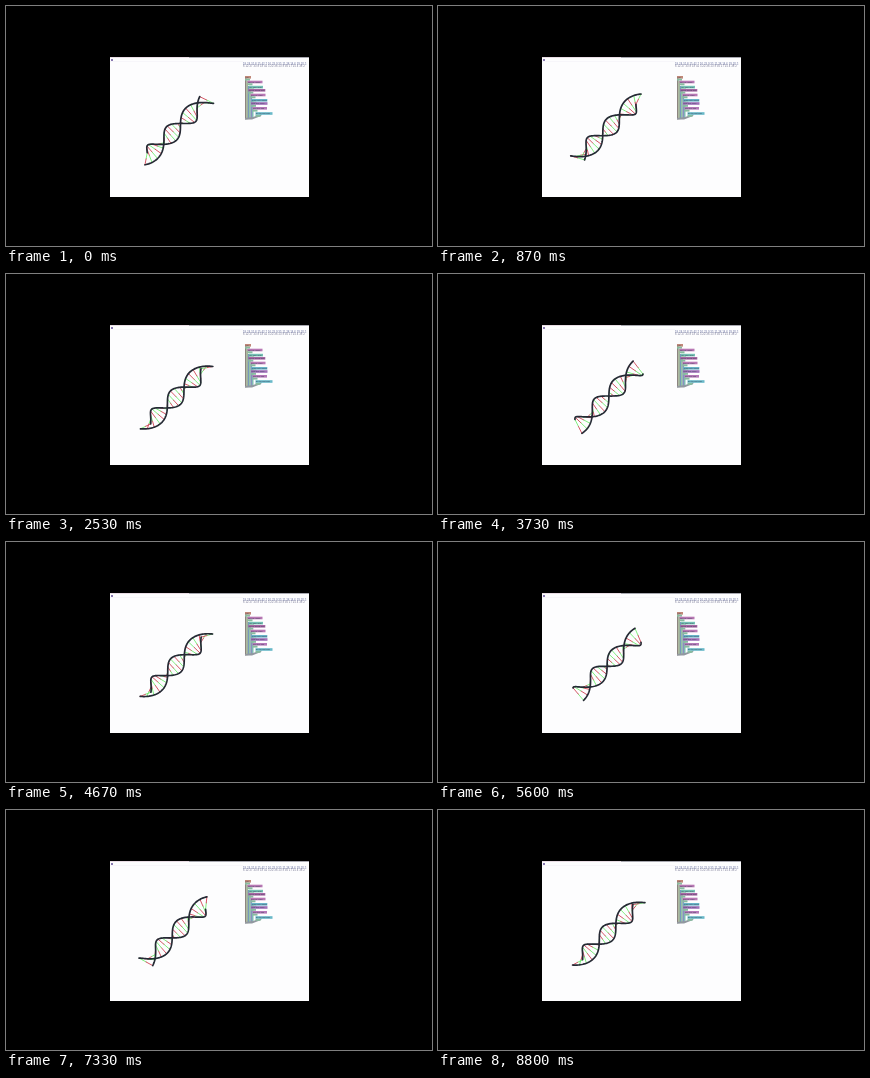
An HTML page with a canvas for the animation above (8.87 s loop, 426 by 240 pixels).

```html
<!DOCTYPE html>
<html lang="en">
<head>
<meta charset="utf-8">
<title>Rotating double helix</title>
<style>
  html, body { margin: 0; height: 100%; overflow: hidden; background: #000; }
  canvas { display: block; width: 100vw; height: 100vh; }
</style>
</head>
<body>
<canvas id="stage" width="426" height="240"></canvas>
<script>
const ctx = document.getElementById('stage').getContext('2d');

const LOOP = 8870, STEP = 200 / 3;
const INK = '#252a34', RED = '#d04455', GREEN = '#72ee72';

// Helix in pixels: axis centre, half length, radius, camera distance
const CENTER = { x: 170.2, y: 122.9 };
const HALF = 41.8, RADIUS = 8.2, CAMERA = 63;
const AXIS = { x: 0.717, y: -0.697 };
const TWIST = 3.2 * Math.PI, START = -1.13, TURN = -0.1;
const RUNGS = 21;

function rect(x, y, w, h, color) {
  ctx.fillStyle = color;
  ctx.fillRect(x, y, w, h);
}

function label(text, x, y, size, color) {
  ctx.font = `${size}px "Liberation Sans", sans-serif`;
  ctx.fillStyle = color;
  ctx.fillText(text, x, y);
}

function line(points, color, width) {
  ctx.beginPath();
  for (const p of points) ctx.lineTo(p.x, p.y);
  ctx.strokeStyle = color;
  ctx.lineWidth = width;
  ctx.stroke();
}

// Position on a strand; u runs from 0 (lower end) to 1 (upper end)
function strandPoint(u, phase) {
  const angle = phase + u * TWIST;
  const zoom = CAMERA / (CAMERA - RADIUS * Math.sin(angle));
  const along = (2 * u - 1) * HALF * zoom;
  const across = RADIUS * Math.cos(angle) * zoom;
  return {
    x: CENTER.x + along * AXIS.x + across * AXIS.y,
    y: CENTER.y + along * AXIS.y - across * AXIS.x
  };
}

function drawHelix(phase) {
  ctx.lineCap = ctx.lineJoin = 'round';
  for (let i = 0; i < RUNGS; i++) {
    const u = i / (RUNGS - 1);
    const a = strandPoint(u, phase), b = strandPoint(u, phase + Math.PI);
    const mid = { x: (a.x + b.x) / 2, y: (a.y + b.y) / 2 };
    const swap = Math.sin(i * 2.3 + 1) < 0;
    line([a, mid], swap ? RED : GREEN, 0.9);
    line([mid, b], swap ? GREEN : RED, 0.9);
  }
  for (const offset of [0, Math.PI]) {
    const points = Array.from({ length: 121 }, (_, i) => strandPoint(i / 120, phase + offset));
    line(points, INK, 1.7);
  }
}

// Nested blocks: indent, row, width, color, words
const BLOCKS = [
  [0, 70, 6, '#c08878', 'run'],
  [2.5, 74.7, 15, '#b878b4', 'set the angle'],
  [4, 79.8, 14, '#74c0b4', 'for each pair'],
  [3.3, 83, 17, '#a866a4', 'move along axis'],
  [5.5, 87.7, 15, '#b878b4', 'turn by step'],
  [6.3, 93, 16, '#68b4c8', 'draw both sides'],
  [6, 96.2, 16.5, '#a070b8', 'pick the color'],
  [7.5, 101, 14.5, '#b478b8', 'join the pair'],
  [10.5, 106.2, 17, '#68b8c8', 'go to next pair']
];
const RAILS = ['#8c8480', '#9eb48c', '#7898bc', '#84bc94', '#8890c0', '#80bcb4'];

function drawBlocks() {
  RAILS.forEach((color, i) => rect(239 + i * 1.4, 70 + i * 5, 1.5, 43.5 - i * 5.2, color));
  ctx.beginPath();
  [[239, 112], [247, 111], [256, 108], [255, 110], [246, 113.5], [239, 113.5]]
    .forEach(([x, y]) => ctx.lineTo(x, y));
  ctx.fillStyle = '#9298a0';
  ctx.fill();
  for (const [indent, y, width, color, words] of BLOCKS) {
    rect(239 + indent, y, width, 2.6, color);
    rect(239 + indent, y + 2.6, 5, 2, '#88bca0');
    label(words, 239.5 + indent, y + 2.1, 2.2, '#384058');
  }
}

function drawPage() {
  rect(0, 0, 426, 240, '#000');
  rect(104, 51, 199, 140, '#fdfdfe');
  rect(104, 51, 79, 1, '#e8dce4');
  rect(183, 51, 120, 1, '#a8a8b0');
  rect(104, 55, 133, 0.5, '#f1eff5');
  rect(105, 53, 2, 2, '#8878b0');
  label('18 24 31 8 15 42 7 16 23 9 35 11 28 14 6 39 20 5', 237, 58.5, 2.9, '#6870a0');
  label('6 12 27 33 8 19 41 5 22 36 13 9 30 17 25 4 38 2', 237, 61.2, 2.9, '#787894');
}

function render(now) {
  const frame = Math.floor(((now % LOOP) + 4) / STEP) % 133;
  drawPage();
  drawBlocks();
  drawHelix(START + TURN * frame);
  requestAnimationFrame(render);
}

render(0);
</script>
</body>
</html>
```
